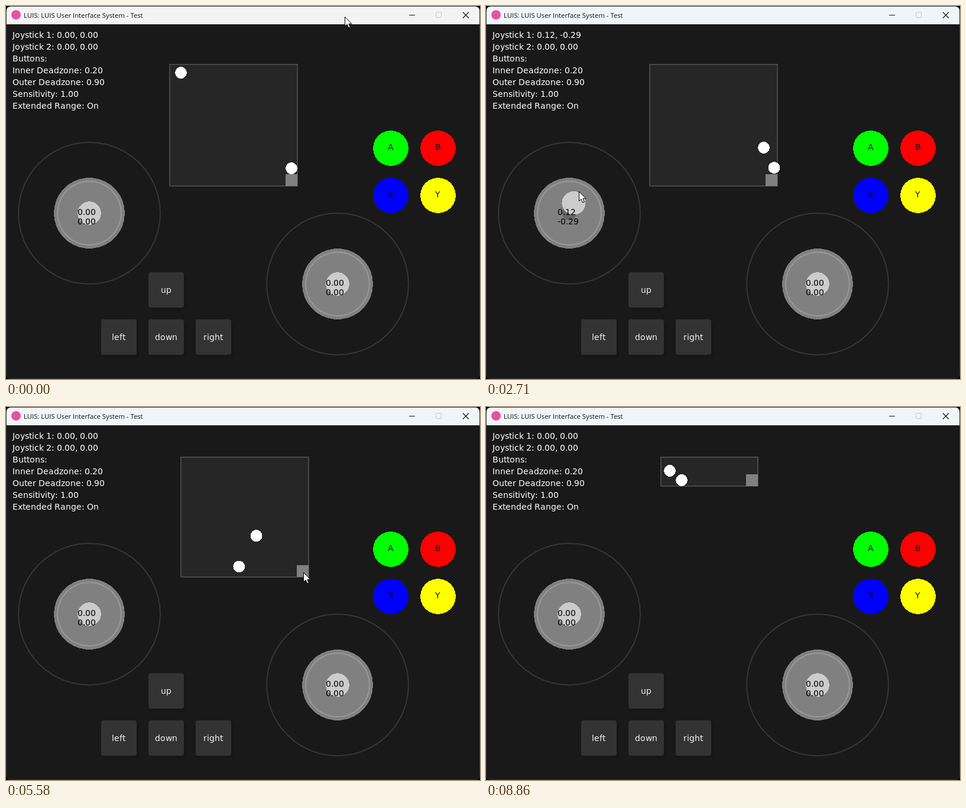
These frames come from a looping animation (802x632 px, 8.94 s). An HTML page:

```html
<!DOCTYPE html>
<html lang="en">
<head>
<meta charset="utf-8">
<title>LUIS User Interface System</title>
<style>
html, body { margin: 0; width: 100%; height: 100%; overflow: hidden; background: #000; }
svg { display: block; width: 802px; height: 632px; }
text { font: 14px "DejaVu Sans", sans-serif; white-space: pre; }
.title { font: 11.3px "Open Sans", sans-serif; }
.crisp { shape-rendering: crispEdges; }
</style>
</head>
<body>
<svg id="stage" viewBox="0 0 802 632"></svg>
<script>
const LOOP = 8940, STEP = 77.3;
const stage = document.getElementById('stage');

function set(el, attrs) {
  for (const k in attrs) el.setAttribute(k, attrs[k]);
}
function add(tag, attrs, text) {
  const el = document.createElementNS('http://www.w3.org/2000/svg', tag);
  set(el, attrs);
  if (text !== undefined) el.textContent = text;
  stage.append(el);
  return el;
}
const place = (el, x, y) => set(el, { transform: `translate(${x} ${y})` });

// Circles are polygons whose side count grows with the radius
function round(x, y, r, attrs) {
  const n = Math.floor(Math.sqrt(r * 20));
  const points = Array.from({ length: n }, (_, i) => {
    const a = i / n * 2 * Math.PI;
    return [r * Math.cos(a), r * Math.sin(a)];
  }).join(' ');
  const el = add('polygon', { points, ...attrs });
  place(el, x, y);
  return el;
}
const disc = (x, y, r, fill) => round(x, y, r, { fill, class: 'crisp' });
const ring = (x, y, r, stroke) => round(x, y, r, { fill: 'none', stroke, 'stroke-width': 2 });

// Glyphs advance by whole pixels
const pen = document.createElement('canvas').getContext('2d');
pen.font = '1400px "DejaVu Sans", sans-serif';
const advance = c => Math.round(pen.measureText(c).width / 100);
const widthOf = s => [...s].reduce((sum, c) => sum + advance(c), 0);
function write(el, s) {
  if (el.textContent === s) return;
  let x = +el.dataset.x;
  const xs = [...s].map(c => (x += advance(c)) - advance(c));
  set(el, { x: xs.join(' ') });
  el.textContent = s;
}
function label(x, y, s, fill) {
  const el = add('text', { y, fill, 'data-x': x });
  write(el, s);
  return el;
}
const centred = (x, y, s, fill) => label(x + Math.floor(30 - widthOf(s) / 2), y, s, fill);

// Window frame and title bar
add('rect', { x: .5, y: .5, width: 801, height: 631, rx: 8, fill: '#191919', stroke: '#333' });
const bar = add('path', { d: 'M1 31V8Q1 1 8 1H794Q801 1 801 8V31Z' });
add('circle', { cx: 17, cy: 15, r: 8, fill: '#e5559f' });
add('text', { x: 30, y: 20, fill: '#111', class: 'title' }, 'LUIS: LUIS User Interface System - Test');
add('path', { d: 'M682 15.5H692', stroke: '#111' });
add('rect', { x: 727.5, y: 10.5, width: 9, height: 9, rx: 1, fill: 'none', stroke: '#c3c5c7' });
add('path', { d: 'M773 10.5L783 20.5M783 10.5L773 20.5', stroke: '#111', 'stroke-width': 1.1 });

const status = ['', '', 'Buttons:', 'Inner Deadzone: 0.20', 'Outer Deadzone: 0.90',
  'Sensitivity: 1.00', 'Extended Range: On'].map((s, i) => label(11, 54 + 20 * i, s, '#fff'));

// Resizable panel
const panel = add('rect', { fill: '#262626', stroke: '#474747', 'stroke-width': 2 });
const grip = add('rect', { width: 20, height: 20, fill: '#808080' });
const balls = [disc(0, 0, 10, '#fff'), disc(0, 0, 10, '#fff')];

// Face buttons and direction pad
['A#0f0', 'B#f00', 'X#00f', 'Y#ff0'].forEach((s, i) => {
  const x = 621 + i % 2 * 80, y = 241 + (i >> 1) * 80;
  disc(x + 30, y, 30, s.slice(1));
  centred(x, y + 3, s[0], '#111');
});
['left', 'down', 'right', 'up'].forEach((s, i) => {
  const x = s === 'up' ? 241 : 161 + 80 * i, y = s === 'up' ? 451 : 531;
  add('rect', { x: x + 4, y: y + 4, width: 61, height: 61, rx: 4, fill: '#161616' });
  add('rect', { x, y, width: 60, height: 60, rx: 4, fill: '#333' });
  centred(x, y + 35, s, '#f2f2f2');
});

function joystick(x, y, grabs) {
  ring(x, y, 120, '#363636');
  disc(x, y, 60, '#808080');
  ring(x, y, 54, '#999');
  disc(x, y, 12, '#666');
  const knob = disc(x, y, 20, '#ccc');
  const out = [3, 19].map(dy => label(x - 20, y + dy, '', '#000'));
  return { x, y, grabs, knob, out };
}
const sticks = [
  joystick(141, 351, [[2600, 3600]]),
  joystick(561, 471, [[940, 1900], [6560, 7420]])
];

const pointer = add('path', {
  d: 'M.5 .5V16.5L4.2 13.1 6.7 19.1 9.3 18 6.8 12.2H11.9Z',
  fill: '#fff', stroke: '#000', 'stroke-linejoin': 'round'
});

// Turning points of the pointer: time, x, y
const mouse = [
  [0, 573, 18], [500, 592, 220], [940, 563, 468], [1259, 583.6, 421.4], [1700, 588, 510],
  [1950, 575, 468], [2600, 143, 349], [2728, 157, 313.6], [3050, 186, 370], [3450, 105, 368],
  [3720, 280, 290], [4120, 376, 206], [4180, 380, 196], [4340, 490, 150], [4540, 510, 228],
  [4738, 394, 183], [4840, 399, 182], [5560, 503, 283], [6050, 451, 126], [6361, 568, 291],
  [6560, 563, 468], [6950, 572, 526], [7420, 585, 460], [7750, 603, 530], [8390, 445, 618],
  [8835, 425, 660]
];
// Bounces of the balls, relative to the panel
const bounces = [
  [[1040, 19, 14], [1259, 47, 14], [1900, 193, 141], [2728, 193, 141], [4120, 192, 137],
    [4738, 166.5, 137], [5560, 131, 137], [6361, 33, 30], [8390, 58, 38], [8835, 15, 23]],
  [[2600, 206, 176], [2728, 210.5, 175], [3850, 215, 191], [5058, 15, 191], [5560, 97, 191],
    [6361, 134, 30], [8280, 151, 39], [8835, 35, 39]]
];

function leg(keys, t) {
  let i = 0;
  while (i < keys.length - 2 && t >= keys[i + 1][0]) i++;
  const a = keys[i], b = keys[i + 1];
  const u = Math.max(0, Math.min(1, (t - a[0]) / (b[0] - a[0])));
  return { a, b, u, before: keys[i - 1] || a, after: keys[i + 2] || b };
}
function straight(keys, t) {
  const { a, b, u } = leg(keys, t);
  return [1, 2].map(k => a[k] + (b[k] - a[k]) * u);
}
// Hermite curve through the keys
function curve(keys, t) {
  const { a, b, u, before, after } = leg(keys, t), v = 1 - u, d = b[0] - a[0];
  const slope = (p, q, k) => (q[k] - p[k]) / (q[0] - p[0]) * d;
  return [1, 2].map(k =>
    v * v * ((1 + 2 * u) * a[k] + u * slope(before, b, k)) +
    u * u * ((1 + 2 * v) * b[k] - v * slope(a, after, k)));
}

// How far the pointer has dragged between times a and b
function drag(t, a, b) {
  const from = curve(mouse, a), to = curve(mouse, Math.max(a, Math.min(b, t)));
  return to.map((v, k) => v - from[k]);
}

// The screen is refreshed in even steps
const hold = t => t < 100 ? 0 : 100 + Math.floor((t - 100) / STEP + .3) * STEP;

function tilt(stick, t, [mx, my]) {
  if (!stick.grabs.some(([a, b]) => t >= a && t < b)) return [0, 0];
  const x = (mx - stick.x) / 60, y = (my - stick.y) / 60, len = Math.hypot(x, y);
  const gain = len < .2 ? 0 : len > 1 ? 1 / len : len * len;
  return [x * gain, y * gain];
}
const show = v => (Math.abs(v) < .005 ? 0 : v).toFixed(2);

function draw(time) {
  const t = hold(time), tip = curve(mouse, t);
  set(bar, { fill: t < 100 ? '#f3f3f3' : '#eef6f9' });
  place(pointer, ...tip.map(Math.round));

  const [dx, dy] = drag(t, 4180, 4840), [dw, dh] = drag(t, 5560, 6050);
  const x = Math.round(277 + dx), y = Math.round(99 + dy);
  const width = Math.round(216 + dw), height = Math.round(206 + dh);
  set(panel, { x, y, width, height });
  set(grip, { x: x + width - 20, y: y + height - 20 });
  balls.forEach((ball, i) => {
    const [bx, by] = straight(bounces[i], t);
    place(ball, x + bx, y + Math.min(by, height - 10));
  });

  sticks.forEach((stick, i) => {
    const v = tilt(stick, t, tip), s = v.map(show);
    place(stick.knob, stick.x + v[0] * 60, stick.y + v[1] * 60);
    stick.out.forEach((el, k) => write(el, s[k]));
    write(status[i], `Joystick ${i + 1}: ${s.join(', ')}`);
  });
}

const start = performance.now();
function tick() {
  draw((performance.now() - start) % LOOP);
  requestAnimationFrame(tick);
}
tick();
</script>
</body>
</html>
```
